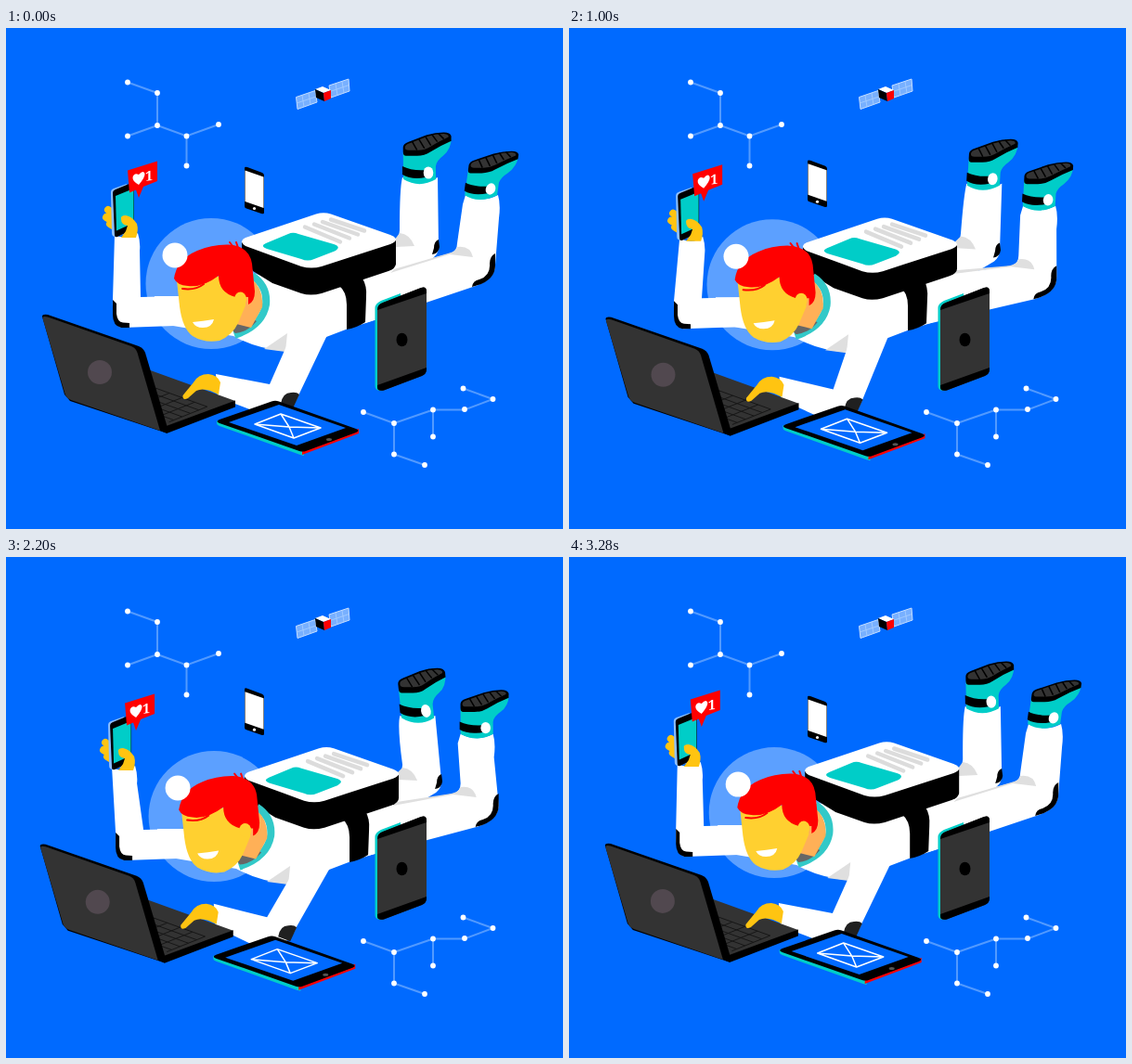
Write an HTML page that moves like this. It is 600 px wide and 540 px high and loops after 3320 ms.

```html
<!DOCTYPE html>
<html lang="en">
<head>
<meta charset="utf-8">
<title>Floating astronaut</title>
<style>
html, body { margin: 0; width: 100%; height: 100%; overflow: hidden; background: #006aff; }
svg { display: block; width: 600px; height: 540px; }
.line { fill: none; stroke: #fff; }
.teal { fill: #00cdc8; }
.dark { fill: #333; }
.white { fill: #fff; }
.red { fill: #f00; }
.skin { fill: #ffc411; }
.face { fill: #ffd030; }
.shade { fill: #dfdfdf; }
</style>
</head>
<body>
<svg viewBox="0 0 600 540">
  <defs>
    <!-- Boot, with its ankle joint at the origin -->
    <g id="boot">
      <path class="teal" d="M-27-22L-6-21L25-37Q25-25 16-18Q9-13 8-7V7Q-10 17-27 7Z"/>
      <path d="M-28-7Q-18-2-3-3V5Q-18 8-28 2Z"/>
      <path d="M-27-27Q-27-31-21-33L-2-40Q8-43 17-43Q24-43 25-39V-34Q13-29 2-22Q-4-18-12-18H-24Q-27-18-27-22Z"/>
      <path class="dark" d="M-25-27Q-25-30-20-31.500L-1-38.500Q8-41.500 17-41.500Q23-41 22-38Q11-33 1-27Q-4-24-11-24H-21Q-25-24-25-27Z"/>
      <path d="M-17-33l5 9M-10-36l6 10M-3-39l6 10M4-41l6 8M11-42l6 6" stroke="#000" stroke-width="1.500"/>
      <ellipse class="white" rx="5.300" ry="6.500"/>
    </g>
  </defs>

  <g id="molecules">
    <path class="line" stroke-opacity=".32" stroke-width="2" d="M131 58.500L163 70V105L131 116.500M163 105L194.500 116.500L229 104M194.500 116.500V148.500M385 414L418 426V459.500L451 471M418 426L460 411.500H494L524.500 400L492.500 388.500M460 411.500V440.500"/>
  </g>

  <g id="satellite" stroke-linejoin="round">
    <path d="M312.500 74.500L333 67.500L335 80L314 87.500ZM348 62L369 55L370 68L350 75Z" fill="#78b0ff" stroke="#c4ddff"/>
    <path d="M313 81L334 74M319 72.500L321 85M326 70L328 82.500M349 68.500L369.500 61.500M355 60L357 72.500M362 57.500L364 70" stroke="#a9ceff" stroke-width=".8"/>
    <path class="white" d="M333 66L341 63L350 67L342 70Z"/>
    <path d="M333 66L342 70L343 79L334 75Z"/>
    <path class="red" d="M342 70L350 67V76L343 79Z"/>
  </g>

  <g id="phone">
    <path d="M257 151Q257 149 260 150L276 156Q278 157 278 159V199Q278 201 275 200L259 194.500Q257 194 257 192Z"/>
    <path class="white" d="M257.500 153.500L277.500 160.500V194L257.500 187Z"/>
    <circle class="white" cx="267.500" cy="194.500" r="1.600"/>
  </g>

  <path id="leg1" class="white"/>
  <path id="shade1" class="shade"/>
  <path id="cap1"/>
  <path id="leg2" class="white"/>
  <path id="shade2" class="shade"/>
  <path id="cap2"/>
  <use id="boot1" href="#boot"/>
  <use id="boot2" href="#boot"/>

  <g id="torso">
    <path class="white" d="M262 264L330 276L400 258L418 250L400 314L366 325L345 333Q320 345 300 348Q270 346 245 332L180 321H160V289H200Z"/>
    <path class="shade" d="M278 346L303 329L301 349Z"/>
    <path d="M358 277L384 270Q389 278 388 290L387 317Q378 323 367 325V298Q367 284 358 277Z"/>
  </g>

  <path id="arm" class="white"/>
  <path id="armCap" d="M115 293L119 297V308Q120 317 126 317.500L133 318V323H124Q115 321 115 309Z"/>
  <circle id="helmet" cx="221" cy="275.500" r="70.500" fill="#fff" opacity=".36"/>

  <g id="pack">
    <path d="M254 231V240L266 262L287 275L318 286Q328 289 340 286L412 262Q420 259 420 254V229Z"/>
    <path class="white" d="M258 226L334 200.500Q342 198 350 200.500L414 223Q426 228 414 233L340 257Q329 260 318 257L258 235Q250 230 258 226Z"/>
    <path class="teal" d="M280 232L304 222Q309 219.500 315 222L353 233Q362 236 354 240.500L332 249Q325 252 318 249L281 238Q273 235 280 232Z"/>
    <path d="M322 214.500l38 16M332 211.500l38 15M341 209l38 13.500M350 206.500l36 12" stroke="#dcdcdc" stroke-width="4.500" stroke-linecap="round"/>
  </g>

  <g id="handset">
    <path d="M110 196L118 202M108 204L118 210M112 211L120 216" stroke="#ffc411" stroke-width="8" stroke-linecap="round"/>
    <path fill="#8dbfff" d="M113 177Q113 174 116 173L130 168L135 220L118 225Q114 225 114 221Z"/>
    <path d="M115 178Q115 175 118 174L135 167Q138 166 138 169V214Q138 217 135 218L120 225Q117 226 117 223Z"/>
    <path class="teal" d="M118 181L137.500 173V210L119 218.500Z"/>
    <path class="skin" d="M124 206Q123 202 129 202Q136 203 141 211Q143 218 140 226H124L129 219L131 213Q124 212 124 206Z"/>
    <path class="red" d="M131 153.500L163 143.500V165L148 171L143 183L140 174.500L133 177.500Z"/>
    <path class="white" transform="translate(143 161) skewY(-17)" d="M0 8Q-7 2-6.500-2Q-5-7 0-3Q5-7 6.500-2Q7 2 0 8Z"/>
    <text class="white" transform="translate(150 165) skewY(-8)" font-family="'Noto Serif', serif" font-size="14.500" font-weight="700">1</text>
  </g>

  <g id="head">
    <path fill="none" stroke="#32c9c8" stroke-width="8" d="M265 267Q282 278 280 298Q276 321 246 331"/>
    <path fill="#666" d="M244 326L256 308L270 316Q260 328 247 329Z"/>
    <path fill="#ffb057" d="M249 300L264 270Q278 281 276 301L264 323L248 319Z"/>
    <path class="face" d="M184 272L187 300Q190 324 201 332Q214 340 230 337Q244 331 250 318L258 299V265Z"/>
    <path class="red" d="M181 270Q184 249 206 240Q222 233 240 233.500Q262 235 265 254L268 284Q268 295 261 298V290H247Q229 285 229 267Q212 280 196 278Q184 277 181 270Z"/>
    <path fill="none" stroke="#f00" stroke-width="2" stroke-linecap="round" d="M190 281Q204 283 213 276M241 231L248 240M248 231L251 240"/>
    <ellipse class="face" cx="252.500" cy="292" rx="6.500" ry="7.500"/>
    <path class="white" d="M201 317Q212 316 224 314Q222 323 212 323Q204 323 201 317Z"/>
  </g>
  <circle id="glint" class="white" cx="182" cy="245" r="13.500"/>

  <path id="forearm" class="white"/>
  <path id="elbowCap" fill="#202020" d="M296 405Q298 393 307 393Q313 392 316 395L309 410Z"/>

  <g id="laptop">
    <path class="dark" d="M150 367L247 402L172 432L150 400Z"/>
    <path transform="matrix(-97 -35 75 -30 172 432)" vector-effect="non-scaling-stroke" fill="none" stroke="#161616" d="M.08 .22H.94M.08 .34H.94M.08 .46H.94M.08 .58H.94M.08 .7H.94M.08 .15V.7M.22 .15V.7M.36 .15V.7M.5 .15V.7M.64 .15V.7M.78 .15V.7M.92 .15V.7"/>
    <path d="M170 430L247 401.500V408.500L173 437L165 433Z"/>
    <path d="M39 311Q39 308 45 309L143 343Q148 345 150 350L174 431L171 436L69 402L63 395Z"/>
    <path class="dark" d="M39.500 313Q39 310 45 311.500L135 343Q140 345 141.500 350L166 434L70 401Q65 399 63.500 394Z"/>
    <circle cx="101" cy="371" r="13" fill="#51484f"/>
    <path class="skin" d="M190.500 396L202 382Q207 373 218 373Q228 374 231 382L229 395L220 391Q211 388 205 391L196 399Q190 402 190.500 396Z"/>
  </g>

  <g id="mail">
    <path class="teal" d="M227 423V426Q227 428 230 429L317 460L321 461V452Z"/>
    <path class="red" d="M319 452L380 432V437L319 460Z"/>
    <path d="M230 422L286 402.500Q290 401 294 402.500L377 432Q382 434 377 436L323 456Q320 457 316 456L230 426Q225 424 230 422Z"/>
    <path fill="#006aff" d="M240 425L294 406L366 431L313 450Z"/>
    <path class="line" stroke-width="1.500" stroke-linejoin="round" d="M268 427L296 416L339 431L310 442ZL305 430L339 431M296 416L305 430L310 442"/>
    <ellipse cx="348" cy="443.500" rx="3" ry="1.500" fill="#555"/>
  </g>

  <g id="tablet">
    <path class="teal" d="M397.500 302Q397.500 297 404 294L425 286V360L404 391Q397.500 391 397.500 386Z"/>
    <path class="dark" d="M400 304Q400 298 406 296L447 280Q453 278 453 284V368Q453 373 448 375L407 390.500Q400 392 400 387Z"/>
    <path d="M400 304Q400 298 406 296L447 280Q453 278 453 284V286L400 304ZM400 385L453 366V368Q453 373 448 375L407 390.500Q400 392 400 387Z"/>
    <ellipse cx="426.500" cy="336" rx="6" ry="7.300"/>
  </g>
</svg>
<script>
const LOOP = 3320, STEP = 40;
const el = id => document.getElementById(id);
const dots = [[131, 58.5], [163, 70], [163, 105], [131, 116.5], [194.5, 116.5], [229, 104], [194.5, 148.5],
  [385, 414], [418, 426], [418, 459.5], [451, 471], [460, 411.5], [494, 411], [524.5, 400], [492.5, 388.5], [460, 440.5]];
el('molecules').innerHTML += dots.map(([x, y]) => `<circle class="white" cx="${x}" cy="${y}" r="2.9"/>`).join('');

function draw(t) {
  const wave = peak => Math.cos((t - peak) / LOOP * 2 * Math.PI);
  // Drift away from the pose at time zero
  const drift = (amp, peak) => amp * (wave(peak) - Math.cos(peak / LOOP * 2 * Math.PI));
  const sway = (ax, px, ay, py) => [drift(ax, px), drift(ay, py)];
  const move = (o, ...ids) => ids.forEach(id => el(id).setAttribute('transform', `translate(${o})`));
  const at = o => (...xy) => xy.map((v, i) => (v + o[i % 2]).toFixed(2)).join(' ');
  const path = (id, d) => el(id).setAttribute('d', d);

  const body = sway(2.8, 2400, 2.3, 1980);
  const hand = sway(2.8, 760, 2.7, 1640);
  const desk = sway(1.6, 600, 1.7, 1250);
  const elbow = sway(2, 600, 3.5, 1500);
  const knee1 = sway(2.8, 2400, 3.5, 1800);
  const knee2 = sway(3, 2350, 9, 1560);
  const foot1 = sway(2.2, 700, 6, 1760);
  const foot2 = sway(4, -100, 8, 1560);

  move(body, 'torso', 'helmet', 'glint', 'armCap');
  move(sway(2.8, 2400, 3.8, 1640), 'pack');
  move(sway(4.2, 2350, 1.5, 1900), 'head');
  move(hand, 'handset');
  move(desk, 'laptop');
  move(elbow, 'elbowCap');
  move(sway(4, 800, 4.2, 1700), 'mail');
  move([0, drift(5.5, 0)], 'phone');

  const boot = (id, x, y, o, skew, tall) =>
    el(id).setAttribute('transform', `matrix(1 0 ${skew} ${tall} ${x + o[0]} ${y + o[1]})`);
  boot('boot1', 455, 156, foot1, .025 - .095 * wave(750), 1.03 - .045 * wave(600));
  boot('boot2', 522, 173.5, foot2, -.055 - .08 * wave(150), .95);

  const b = at(body), h = at(hand), d = at(desk), e = at(elbow);
  const k1 = at(knee1), k2 = at(knee2), f1 = at(foot1), f2 = at(foot2);
  path('leg1', `M${f1(427, 161)}Q${f1(446, 171, 465, 161)}L${k1(466, 236)}Q${k1(466, 243, 460, 248)}L${b(440, 262, 405, 275, 415, 231)}Q${k1(424, 227, 424, 218)}Q${f1(424, 172, 427, 161)}Z`);
  path('shade1', `M${k1(424, 221)}Q${k1(435, 222, 440, 235)}L${b(420, 236, 418, 229)}Z`);
  path('cap1', `M${k1(466, 228)}Q${k1(461, 230, 461, 237)}L${k1(459, 244)}Q${k1(466, 243, 467, 236)}Z`);
  path('leg2', `M${f2(495, 180)}Q${f2(513, 189, 530, 180)}Q${f2(533, 190, 531, 205)}L${k2(527, 255)}Q${k2(527, 272, 503, 279)}L${b(387, 318, 387, 268)}L${k2(478, 243)}Q${k2(486, 241, 486, 232)}L${f2(492, 190)}Z`);
  path('shade2', `M${k2(486, 236)}Q${k2(500, 234, 503, 247)}L${k2(478, 244)}L${b(414, 264, 418, 260)}L${k2(476, 243)}Q${k2(485, 241, 486, 236)}Z`);
  path('cap2', `M${k2(527, 243)}Q${k2(521, 246, 521, 254)}Q${k2(522, 267, 510, 271)}Q${k2(503, 272, 502, 279)}Q${k2(528, 273, 527, 254)}Z`);
  path('arm', `M${h(117, 223)}Q${h(132, 230, 142, 221)}Q${h(145, 231, 144, 240)}L${b(145, 290, 190, 289, 210, 320, 125, 323)}Q${b(114, 321, 115, 293)}Z`);
  path('forearm', `M${d(226, 373)}L${e(284, 384)}L${b(302, 343, 346, 331)}L${e(316, 394)}Q${e(310, 410, 300, 411)}L${e(265, 412)}L${d(228, 398)}Z`);
}

function tick() {
  draw(Math.floor(performance.now() % LOOP / STEP) * STEP);
  requestAnimationFrame(tick);
}
tick();
</script>
</body>
</html>
```
